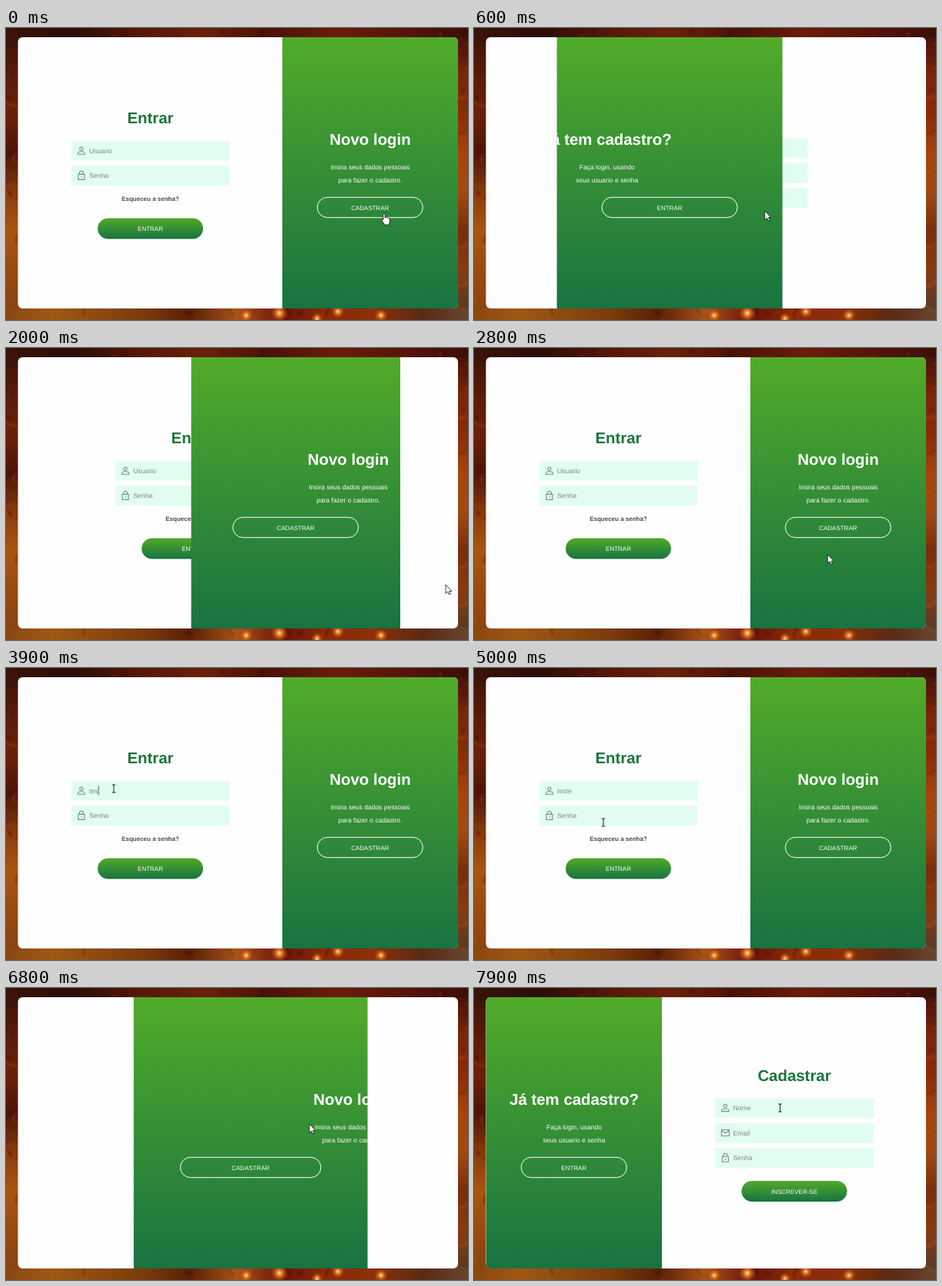
An HTML page with a canvas for the animation above (8 s loop, 600x380 px).

```html
<!DOCTYPE html>
<html lang="pt">
<head>
<meta charset="utf-8">
<title>Entrar</title>
<style>
html, body { margin: 0; width: 100%; height: 100%; overflow: hidden; background: #5a1c08; }
canvas, svg { position: absolute; left: 0; top: 0; }
text { font-family: "Liberation Sans", Arial, sans-serif; font-size: 8.7px; text-rendering: geometricPrecision; }
.title { font-weight: bold; font-size: 20.4px; text-anchor: middle; }
.form .title { fill: #1a7539; }
.para { font-size: 8.5px; text-anchor: middle; }
.btn { font-size: 8px; text-anchor: middle; fill: #fff; }
.forgot { font-size: 8px; font-weight: bold; text-anchor: middle; fill: #4a4b42; }
.field rect { fill: #e1fdf0; }
.field text { fill: #7b8983; }
.icon { fill: none; stroke: #789087; stroke-width: 1.1; }
#panel text { fill: #fff; }
</style>
</head>
<body>
<canvas id="bg" width="600" height="380"></canvas>
<svg width="600" height="380">
  <defs>
    <linearGradient id="green" x2="0" y2="1">
      <stop stop-color="#51ab29"/><stop offset="1" stop-color="#187341"/>
    </linearGradient>
    <clipPath id="card"><rect x="15.5" y="12" width="571.5" height="353" rx="6"/></clipPath>
    <clipPath id="panelClip"><rect id="clip" y="12" height="353"/></clipPath>
    <path id="user" class="icon" d="M0-4.6a2.2 2.2 0 1 1-.01 0ZM-4.6 4.6V3Q-4 1.2 0 1.2T4.6 3V4.6Z"/>
    <path id="lock" class="icon" d="M-4-1.6H4V5.4H-4ZM-2.5-1.6V-3.2a2.5 2.5 0 0 1 5 0V-1.6M0 1.2V2.8"/>
    <path id="mail" class="icon" d="M-5-4H5V4H-5ZM-5-3.4L0 .3L5-3.4"/>
  </defs>
  <g clip-path="url(#card)">
    <rect width="600" height="380" fill="#fefeff"/>
    <g id="login" class="form"></g>
    <g id="signup" class="form"></g>
    <g id="panel" clip-path="url(#panelClip)">
      <rect id="fill" y="12" height="353" fill="url(#green)"/>
      <g id="newLogin">
        <text class="title" x="473" y="152">Novo login</text>
        <text class="para" x="473" y="183.6">Insira seus dados pessoais</text>
        <text class="para" x="473" y="201">para fazer o cadastro.</text>
      </g>
      <g id="welcome">
        <text class="title" x="130" y="152">Já tem cadastro?</text>
        <text class="para" x="130" y="183.6">Faça login, usando</text>
        <text class="para" x="130" y="201">seus usuario e senha</text>
      </g>
      <rect id="pill" y="220.3" height="26.4" rx="13.2" fill="none" stroke="#fff"/>
      <text id="pillText" class="btn" y="236.6"></text>
    </g>
  </g>
  <g id="cursor">
    <path id="arrow" fill="#fff" stroke="#111" stroke-width=".8" d="M0 0V11.5L2.7 9L4.5 13L6.3 12.2L4.6 8.4H8Z"/>
    <path id="hand" fill="#fff" stroke="#111" stroke-width=".9" d="M-1.2 1Q0-.9 1.2 1V5.6Q2.5 4.6 3.4 6Q4.7 5.2 5.5 6.6Q7.4 6 7.6 8V11Q7.2 13 6.2 15.2H.6Q-.6 12.4-3.4 9Q-3.4 6.8-1.2 8.6Z"/>
    <path id="beam" fill="none" stroke="#222" stroke-width="1" d="M-2.3-5H2.3M0-5V5M-2.3 5H2.3"/>
  </g>
</svg>
<script>
const $ = id => document.getElementById(id);
const LOOP = 8000, SLIDE = 800, COL = 228.5;
const RIGHT = 358.6, LEFT = 15.5;
const mix = (a, b, k) => a + (b - a) * k;
const set = (id, attrs) => { for (const k in attrs) $(id).setAttribute(k, attrs[k]); };
const show = (id, on) => { $(id).style.display = on ? '' : 'none'; };

// Forms
const field = (x, y, icon, label, id = '') =>
  `<g class="field"><rect x="${x}" y="${y}" width="206" height="25.6"/>
   <use href="#${icon}" x="${x + 13.4}" y="${y + 12.6}"/>
   <text x="${x + 23.5}" y="${y + 15.9}" ${id && `id="${id}"`}>${label}</text></g>`;
const button = (cx, y, label) =>
  `<rect x="${cx - 68.5}" y="${y}" width="137" height="27" rx="13.5" fill="url(#green)"/>
   <text class="btn" x="${cx}" y="${y + 16.6}">${label}</text>`;
$('login').innerHTML = '<text class="title" x="187.5" y="124.3">Entrar</text>' +
  field(84.5, 147, 'user', 'Usuario', 'userText') + field(84.5, 179.4, 'lock', 'Senha') +
  '<text class="forgot" x="187.5" y="224.6">Esqueceu a senha?</text>' + button(187.5, 247.5, 'ENTRAR') +
  '<path id="caret" stroke="#333" stroke-width=".8" d="M0 153.5V165.5"/>';
$('signup').innerHTML = '<text class="title" x="416" y="121">Cadastrar</text>' +
  field(313, 143.4, 'user', 'Nome') + field(313, 175.9, 'mail', 'Email') +
  field(313, 208.3, 'lock', 'Senha') + button(416, 251, 'INSCREVER-SE');

// Fiery backdrop, seen only around the card
function paintBackdrop() {
  const c = $('bg').getContext('2d');
  let seed = 7;
  const rnd = () => (seed = seed * 16807 % 2147483647) / 2147483647;
  const strip = (x, y, w, h, colors) => {
    const g = c.createLinearGradient(x, y, w > h ? x + w : x, w > h ? y : y + h);
    colors.split(' ').forEach((s, i, a) => g.addColorStop(i / (a.length - 1), '#' + s));
    c.fillStyle = g;
    c.fillRect(x, y, w, h);
  };
  strip(0, 0, 600, 20, '38140a 2c0c06 541808 6a2009 4a1206 6a1c08 571408 3c0e08');
  strip(0, 360, 600, 20, '8a4810 a05812 8a4a10 7a3a0c 5a2008 a85218 6a1408 8a2c0a 8a3008 5a2a14 664630');
  strip(0, 12, 20, 353, '38140a 5a1c08 6b1f08 4a1407 8a3a0c a85612 9a4a10 8a4410');
  strip(580, 12, 20, 353, '4a1208 7a260a 8a2c0a a8440c a04a10 7a2c0c 8a3a10 5a3a24');
  c.filter = 'blur(1px)';
  for (let i = 0; i < 420; i++) {
    const x = rnd() * 600, y = rnd() * 380, a = rnd() * 3, r = 4 + rnd() * 12;
    c.strokeStyle = rnd() < .55 ? 'rgba(35,6,3,.32)' : 'rgba(215,95,22,.24)';
    c.lineWidth = 1 + rnd() * 3;
    c.beginPath();
    c.arc(x, y, r, a, a + 1.2);
    c.stroke();
  }
  c.filter = 'none';
  for (const [x, y, r] of [[355, 371, 12], [431, 369, 9], [404, 378, 8], [487, 374, 9], [312, 374, 9]]) {
    const g = c.createRadialGradient(x, y, 0, x, y, r);
    g.addColorStop(0, '#fff0b8');
    g.addColorStop(.3, 'rgba(250,150,50,.8)');
    g.addColorStop(1, 'rgba(200,60,10,0)');
    c.fillStyle = g;
    c.fillRect(x - r, y - r, 2 * r, 2 * r);
  }
}
paintBackdrop();

// [start, goes to the sign-up side]
const slides = [[100, 1], [1400, 0], [6450, 1]];
const typed = [[3500, 't'], [3650, 'te'], [3850, 'tes'], [4050, 'test'], [4200, 'teste']];
// Pointer: time, x, y
const path = [
  [0, 491, 241], [300, 491, 241], [1100, 133, 232], [1450, 133, 232], [2000, 571, 308],
  [2600, 571, 308], [3200, 140, 157], [4400, 140, 157], [4900, 168, 201], [5400, 168, 201],
  [6200, 480, 236], [6450, 480, 236], [6800, 394, 177], [7300, 397.5, 156], [8000, 397.5, 156]
];

function pointer(t) {
  const i = path.findIndex(p => p[0] > t), a = path[i - 1], b = path[i];
  const k = (t - a[0]) / (b[0] - a[0]), e = k * k * (3 - 2 * k);
  return [mix(a[1], b[1], e), mix(a[2], b[2], e)];
}

function pointerKind(x, y, q) {
  const inside = (l, top, w, h) => x >= l && x <= l + w && y >= top && y <= top + h;
  if (q > 0 && q < 1) return 'arrow';
  const fx = q ? 313 : 84.5;
  if ((q ? [143.4, 175.9, 208.3] : [147, 179.4]).some(top => inside(fx, top, 206, 25.6))) return 'beam';
  return inside(q ? 61.5 : 404.5, 220, 137, 27) || inside(fx + 34, q ? 251 : 247.5, 137, 27) ? 'hand' : 'arrow';
}

function draw(t) {
  const [start, left] = slides.filter(s => s[0] <= t).pop() || [-SLIDE, 0];
  const p = Math.min(1, (t - start) / SLIDE);
  const q = left ? p : 1 - p;              // 0 login, 1 sign-up
  const isLogin = q < .5 || (q === .5 && !left);

  // The green panel widens up to the middle, then narrows again
  const k = 1 - Math.abs(2 * p - 1), mid = left ? 138 : 122;
  const x = mix(isLogin ? RIGHT : LEFT, mid, k), width = mix(COL, 315, k);
  set('clip', { x, width });
  set('fill', { x, width });
  set('pill', { x: x + width * .2, width: width * .6 });
  set('pillText', { x: x + width / 2 });
  $('pillText').textContent = isLogin ? 'CADASTRAR' : 'ENTRAR';

  const drift = p < .5 ? 48 * p : 114 * (1 - p);
  set('newLogin', { transform: `translate(${-drift})` });
  set('welcome', { transform: `translate(${drift})` });
  set('login', { transform: `translate(${COL * q})` });
  set('signup', { transform: `translate(${-COL * (1 - q)})` });
  for (const id of ['newLogin', 'login']) show(id, isLogin);
  for (const id of ['welcome', 'signup']) show(id, !isLogin);

  const word = typed.filter(w => w[0] <= t).pop();
  $('userText').textContent = word ? word[1] : t >= 3300 && t < 3500 ? 'Usuario' : 'Usuario';
  const focused = t >= 3300 && t < 5000;
  show('caret', focused && (t < 4300 || (t - 4200) % 1000 < 500));
  if (focused) set('caret', { transform: `translate(${108.6 + (word ? $('userText').getComputedTextLength() : 0)})` });

  const [cx, cy] = pointer(t), kind = pointerKind(cx, cy, q);
  set('cursor', { transform: `translate(${cx} ${cy})` });
  for (const id of ['arrow', 'hand', 'beam']) show(id, id === kind);
}

const begin = performance.now();
function tick() {
  const t = (performance.now() - begin) % LOOP;
  draw(Math.floor(t / 100) * 100);         // ten pictures a second
  requestAnimationFrame(tick);
}
tick();
</script>
</body>
</html>
```
